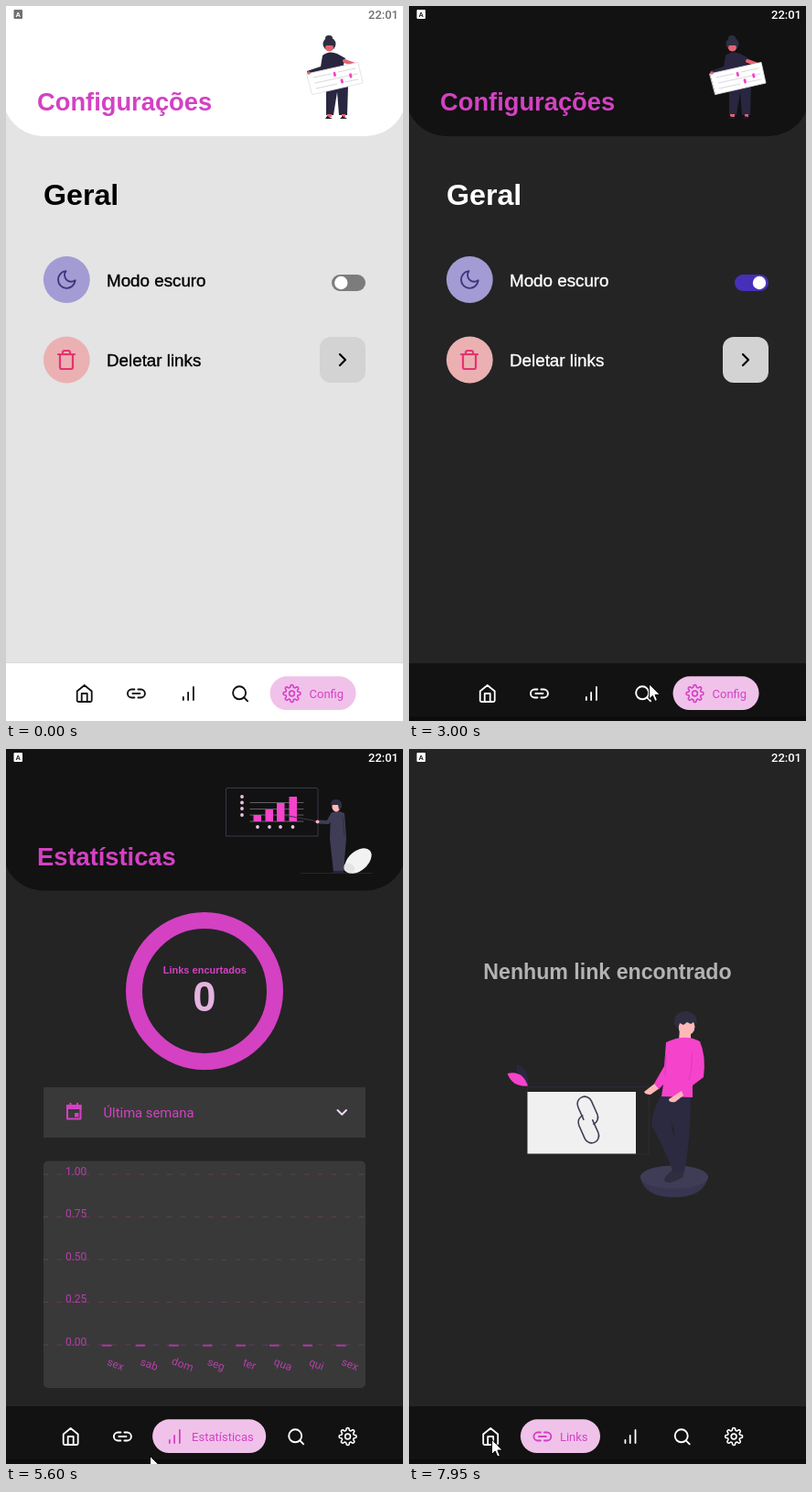
Animation, 434 px wide and 780 px high, one loop 8 s. Source, as an HTML page with a canvas:

```html
<!DOCTYPE html>
<html lang="pt-BR">
<head>
<meta charset="utf-8">
<title>Configurações</title>
<style>
  html, body { margin: 0; width: 100%; height: 100%; overflow: hidden; background: #242424; }
  canvas { display: block; width: 434px; height: 780px; }
</style>
</head>
<body>
<canvas id="stage"></canvas>
<script>
const W = 434, H = 780, LOOP = 8000;
const canvas = document.getElementById('stage');
const ctx = canvas.getContext('2d');
const dpr = window.devicePixelRatio || 1;
canvas.width = W * dpr;
canvas.height = H * dpr;

const PINK = '#d441c3', HOT = '#f543cb', INK = '#2f2e41', SLATE = '#3f3d56', SKIN = '#ffb8b8';
const SANS = '"Liberation Sans", Arial, sans-serif';
const ROBOTO = 'Roboto, sans-serif';

const THEME_AT = 1960;
const clamp = v => Math.max(0, Math.min(1, v));
const mix = (a, b, p) => a + (b - a) * p;
const ramp = (t, from, to) => clamp((t - from) / (to - from));
const easeInOut = p => p < .5 ? 2 * p * p : 1 - 2 * (1 - p) * (1 - p);

// Drawing helpers

function fill(color, d) {
  ctx.fillStyle = color;
  ctx.fill(new Path2D(d));
}

function line(color, width, d) {
  ctx.strokeStyle = color;
  ctx.lineWidth = width;
  ctx.lineCap = ctx.lineJoin = 'round';
  ctx.stroke(new Path2D(d));
}

function box(color, x, y, w, h, r = 0) {
  ctx.fillStyle = color;
  ctx.beginPath();
  ctx.roundRect(x, y, w, h, r);
  ctx.fill();
}

function oval(color, x, y, rx, ry = rx, turn = 0) {
  ctx.fillStyle = color;
  ctx.beginPath();
  ctx.ellipse(x, y, rx, ry, turn, 0, Math.PI * 2);
  ctx.fill();
}

function ring(color, x, y, r, width) {
  ctx.strokeStyle = color;
  ctx.lineWidth = width;
  ctx.beginPath();
  ctx.arc(x, y, r, 0, Math.PI * 2);
  ctx.stroke();
}

function at(x, y, draw, turn = 0, scale = 1) {
  ctx.save();
  ctx.translate(x, y);
  ctx.rotate(turn);
  ctx.scale(scale, scale);
  draw();
  ctx.restore();
}

function text(s, x, y, size, color, { weight = 400, family = SANS, align = 'left', heavier = 0 } = {}) {
  ctx.font = `${weight} ${size}px ${family}`;
  ctx.textAlign = align;
  ctx.fillStyle = color;
  ctx.fillText(s, x, y);
  if (heavier) {
    ctx.strokeStyle = color;
    ctx.lineWidth = heavier;
    ctx.strokeText(s, x, y);
  }
}

// Icons, centred on the origin

const icons = {
  home(c) {
    line(c, 1.8, 'M-8 -2.5L0 -9L8 -2.5V7.5a1.5 1.5 0 0 1 -1.5 1.5H-6.5a1.5 1.5 0 0 1 -1.5 -1.5ZM-3 9V0H3V9');
  },
  link(c) {
    line(c, 1.9, 'M-2 -4.5H-5a4.5 4.5 0 0 0 0 9H-2M2 -4.5H5a4.5 4.5 0 0 1 0 9H2M-4 0H4');
  },
  bars(c) {
    line(c, 1.8, 'M-5.3 7V4M0 7V-1M5.8 7V-7');
  },
  search(c) {
    ring(c, -.7, -.7, 7, 1.9);
    line(c, 1.9, 'M4.4 4.4L8.3 8.3');
  },
  gear(c) {
    ctx.beginPath();
    for (let i = 0; i <= 120; i++) {
      const a = i / 120 * Math.PI * 2;
      const r = 8.1 + 1.3 * Math.tanh(2 * Math.cos(8 * a + Math.PI)) / Math.tanh(2);
      ctx.lineTo(r * Math.cos(a + .39), r * Math.sin(a + .39));
    }
    ctx.closePath();
    ctx.strokeStyle = c;
    ctx.lineWidth = 1.6;
    ctx.lineJoin = 'round';
    ctx.stroke();
    ring(c, 0, 0, 2.9, 1.6);
  }
};

// Bottom navigation

const tabs = [
  { icon: 'home', label: 'Início' },
  { icon: 'link', label: 'Links' },
  { icon: 'bars', label: 'Estatísticas' },
  { icon: 'search', label: 'Pesquisa' },
  { icon: 'gear', label: 'Config' }
];
const STEP = 56.7;

const visits = [
  { tab: 4, at: -2000, page: settingsPage },
  { tab: 3, at: 3270, page: searchPage },
  { tab: 2, at: 4980, page: statsPage },
  { tab: 1, at: 6490, page: linksPage }
];
const PAGE_DELAY = 160, PILL_DELAY = 140, PILL_TIME = 450;

function layout(active) {
  ctx.font = `400 13px ${ROBOTO}`;
  const label = ctx.measureText(tabs[active].label).width;
  const first = 104.5 - label / 2;
  const x = tabs.map((_, i) => first + STEP * i + (i > active ? label + 8.5 : 0));
  return { x, pill: label + 56.5 };
}

function navBar(t, dark) {
  box(dark ? '#121212' : '#ffffff', 0, 717, W, 63);
  if (dark) box('#0c0c0c', 0, 775, W, 5);
  else box('#d9d9d9', 0, 716, W, 1);

  const n = visits.findLastIndex(v => t >= v.at);
  const { tab, at: began } = visits[n];
  const now = layout(tab);
  const from = n ? layout(visits[n - 1].tab).x[tab] : now.x[tab];
  const p = easeInOut(ramp(t, began + PILL_DELAY, began + PILL_DELAY + PILL_TIME));
  const center = mix(from, now.x[tab], p);
  const width = mix(48, now.pill, p);

  tabs.forEach(({ icon }, i) => {
    if (i !== tab) at(now.x[i], 750, () => icons[icon](dark ? '#ffffff' : '#111111'));
  });

  ctx.save();
  ctx.beginPath();
  ctx.roundRect(center - 24, 731.3, width, 36.8, 18.4);
  ctx.fillStyle = '#f0c2ea';
  ctx.fill();
  ctx.clip();
  at(center, 750, () => icons[tabs[tab].icon](PINK));
  ctx.globalAlpha = p;
  text(tabs[tab].label, center + 19, 755.3, 13, PINK, { family: ROBOTO });
  ctx.restore();
}

// Shared page parts

function statusBar(t, dark) {
  const g = Math.round(dark ? mix(66, 255, ramp(t, 2020, 2230)) : 112);
  const color = `rgb(${g},${g},${g})`;
  box(color, 8.5, 4, 9.5, 10, 1);
  text('A', 13.3, 11.8, 7.5, dark ? '#202020' : '#ffffff', { weight: 700, align: 'center' });
  text('22:01', 429, 14, 13, color, { weight: 500, family: ROBOTO, align: 'right' });
}

function header(title, bottom, dark) {
  box(dark ? '#121212' : '#ffffff', -4, -60, W + 8, bottom + 60, 45);
  text(title, 34, bottom - 28, 27.3, PINK, { weight: 700 });
}

function bigText(s, y) {
  text(s, 217, y, 23.15, '#b3b3b3', { weight: 700, align: 'center' });
}

// Pages

function settingsPage(t, dark) {
  header('Configurações', 142, dark);
  checkHolder();
  const ink = dark ? '#ffffff' : '#000000';
  text('Geral', 41, 217, 32.2, ink, { weight: 700 });

  oval('#a39bd3', 66.3, 298.5, 25.4);
  at(66.3, 298.5, () => line('#40347c', 1.8,
    'M9 .8A9 9 0 1 1 -.8 -9A7 7 0 0 0 9 .8Z'), 0, 1.04);
  text('Modo escuro', 110, 306, 18.8, ink, { heavier: .35 });
  box(dark ? '#4630b9' : '#7c7c7c', 356, 293, 37, 18, 9);
  oval('#ffffff', mix(366.3, 383, easeInOut(ramp(t, 2030, 2250))), 302, 7.2);

  oval('#ebb1b2', 66.3, 386, 25.4);
  at(66, 386, () => line('#e6336f', 2.2,
    'M-9 -6H9M-7 -6V8a2 2 0 0 0 2 2H5a2 2 0 0 0 2 -2V-6M-4 -6V-8a2 2 0 0 1 2 -2H2a2 2 0 0 1 2 2V-6'));
  text('Deletar links', 110, 393, 18.8, ink, { heavier: .35 });
  box('#d3d3d3', 343, 361, 50, 50, 12);
  line('#000000', 2.2, 'M365 380L371 386L365 392');
}

function checkHolder() {
  const cloth = '#292640';
  fill(cloth, 'M350 86H374L373 119H364L362 94L358 119H350Z');
  fill('#e26472', 'M351 118h5v3h-5zM367 118h4v3h-4z');
  fill('#1d1b2e', 'M349 123L351 120L357 123ZM365 123L368 120L373 123Z');
  fill(cloth, 'M346 54Q353 48 362 52L371 57L369 64L373 70V92H350V72L330 74L329 71L344 66Z');
  line('#e26472', 4, 'M370 60L384 65');
  oval(INK, 353, 35, 4, 3);
  oval(INK, 353.5, 41.5, 7);
  oval('#e26472', 353.5, 45.5, 4.5, 4);
  box(INK, 347, 39, 13, 4, 1);
  const sheet = 'M329 74L385 61.5L390 84L335 96.5Z';
  fill('#ffffff', sheet);
  line('#e3e3e6', .9, sheet);
  line('#d5d5da', .9, 'M336 78L355 74M363 72L382 68M338 84L384 74M339 90L362 85M370 83L385 80');
  for (const [x, y] of [[359, 74.5], [367, 82], [376.5, 76]]) {
    line(HOT, 2.8, `M${x} ${y - 1.2}l.6 2.4`);
  }
  oval('#e26472', 331, 73, 1.8);
}

function searchPage() {
  box('#3a3a3a', 41, 53, 352, 55, 9);
  at(67, 80, () => icons.search('#ffffff'), 0, 1.17);
  text('Pesquisar', 94, 87, 16.6, '#232323');
  bigText('Pesquise entre seus links', 254.5);
  bigText('encurtados', 279.5);
  browserWindow();
  searcher();
}

function browserWindow() {
  box('#e6e6e6', 68.5, 314, 267.5, 172);
  box(HOT, 68.5, 314, 267.5, 11.6);
  for (const x of [76.5, 85, 93]) oval('#ffffff', x, 320, 2.1);
  box('#ffffff', 76.5, 335.5, 251.5, 140.5);
  const blocks = [[99, 350, 65, 111], [175, 389, 54, 27], [175, 430, 54, 31],
    [241, 350, 65, 49], [241, 413, 65, 48]];
  for (const b of blocks) box('#e6e6e6', ...b);
  box(HOT, 175, 350, 54.5, 31);
}

function searcher() {
  line('#8b8b8d', 1, 'M204.5 545.5H361.5');
  fill(SKIN, 'M258 533h7l-1 8h-6zM307 530l7 -1l2 7l-6 2z');
  fill(INK, 'M249 545.5Q252 541 258 540L266 540V545.5ZM302 545.5Q304 540 310 538L317 540V545.5Z');
  fill('#2c2941', 'M264 474L306 470Q314 500 322 531L304 535L286 478L284 482Q274 510 267 535L250 534Q258 500 264 474Z');
  fill(INK, 'M280 412Q294 404 310 409L323 432Q324 440 312 448L315 478Q288 479 261 474L265 430L270 416Z');
  fill(HOT, 'M281 411L297 407Q297 430 291 444L276 438Z');
  fill(SKIN, 'M282 393H294V405Q287 407 282 400Z');
  fill(INK, 'M278 392Q280 377 295 378Q309 381 308 396L308 404Q300 407 293 403L293 391L284 391L281 394Z');
  oval(SKIN, 262, 430, 5, 4, .4);

  ring(INK, 206.5, 374.5, 44.5, 6);
  ctx.save();
  ctx.beginPath();
  ctx.arc(206.5, 374.5, 46, 0, Math.PI * 2);
  ctx.arc(209.5, 373, 44, 0, Math.PI * 2, true);
  ctx.fillStyle = '#272538';
  ctx.fill('evenodd');
  ctx.restore();
  ring(SLATE, 206.5, 374.5, 50, 12);
  line(SLATE, 7, 'M247 408L262 420');
  line(SLATE, 10.5, 'M262 420L318.5 468.5');
  oval(SKIN, 296, 445, 4.8, 4.4);
  line(INK, 9, 'M316 434L303 443');
}

function statsPage(t, dark) {
  header('Estatísticas', 154.5, dark);
  presenter();
  ring(PINK, 217, 264, 77, 18);
  text('Links encurtados', 217.3, 245, 11, PINK, { weight: 700, align: 'center' });
  text('0', 217, 286, 45.5, '#e4b3df', { weight: 700, align: 'center' });

  box('#393939', 41, 369, 352, 55);
  line(PINK, 2, 'M67 389H81.5V403.5H67ZM70.5 389V386.7M78 389V386.7');
  box(PINK, 66, 388, 16.5, 5);
  box(PINK, 75, 397, 4.5, 4.5);
  text('Última semana', 106.5, 402.3, 14.8, PINK, { family: ROBOTO });
  line('#f3d5f0', 2, 'M362.5 394L367.3 398.7L372 394');
  chart();
}

function chart() {
  box('#393939', 41, 449.5, 352, 247.5, 5);
  ctx.save();
  ctx.setLineDash([5, 10]);
  for (let i = 0; i < 5; i++) {
    line('rgba(212,65,195,.25)', 1, `M41 ${464 + i * 46.5}H393`);
  }
  ctx.restore();
  for (let i = 0; i < 5; i++) {
    text((1 - i / 4).toFixed(2), 88.3, 464.8 + i * 46.5, 12, '#b53fa8', { family: ROBOTO, align: 'right' });
  }
  'sex sab dom seg ter qua qui sex'.split(' ').forEach((day, i) => {
    const x = 105 + i * 36.6;
    box('#a93c9d', x, 649.7, 10.5, 2);
    at(x + 13.5, 675, () => text(day, 0, 0, 12, '#b53fa8', { family: ROBOTO, align: 'center' }), .35);
  });
}

function presenter() {
  line(SLATE, .9, 'M242 42.5H339Q341 42.5 341 44.5V95H240.5V44Q240.5 42.5 242 42.5Z');
  line('#77737c', .8, 'M267 58.5H325M267 65.5H325M267 72H325M267 79H325');
  [7, 13, 20, 27].forEach((h, i) => box(HOT, [270.5, 283.5, 296, 309.5][i], 79 - h, 8.5, h));
  for (const y of [52, 58.5, 65, 72]) oval('#e5c4df', 258, y, 1.9);
  for (const x of [275, 288, 300, 313.5]) oval('#e5c4df', x, 85, 1.9);
  line('#2b2936', .8, 'M322 135.5H400');
  oval('#f2f2f2', 385, 122, 17, 10.5, -.72);
  oval('#e4e4e4', 375, 130, 6.5, 5, .5);
  line('#3b3950', 1.1, 'M341 79L306 72.5');
  fill(SLATE, 'M355 70Q362 66 370 70L372 97L369 134H363L362 104L363 134H358L354 98Z');
  fill('#262438', 'M358 133H364V136H355ZM364 133H369V136H363Z');
  line(SLATE, 4, 'M356 73L352 80L342 79.5');
  line('#302e44', 1, 'M368 74L370 95');
  oval(SKIN, 340.5, 79.3, 1.9);
  oval(SKIN, 361, 63, 4.6, 5.4);
  fill(INK, 'M355 61Q355 54.5 361 55Q368 55 367 64L364 66L363 61Z');
}

function linksPage() {
  bigText('Nenhum link encontrado', 250.8);
  fill('#292740', 'M130 367Q115 358 118 344Q132 349 130 367Z');
  fill(HOT, 'M130 367.5Q113 369 107.5 354Q124 350 130 367.5Z');
  line('#2d2b38', 1, 'M130 368.5H262.5V442H130Z');
  box('#f0f0f0', 129.5, 374, 118.5, 67.5);
  const loop = 'M-8 7V-8a8 8 0 0 1 16 0V8a8 8 0 0 1 -8 8';
  at(195.3, 394.5, () => line(SLATE, 1.6, loop), -.42);
  at(196.3, 414.5, () => line(SLATE, 1.6, loop), Math.PI - .42);
  standingMan();
}

function standingMan() {
  fill('#383550', 'M253 468Q258 489 290 489Q321 489 327 468Z');
  oval(SLATE, 290, 467, 37.2, 12.6);
  fill('#2c2a40', 'M276 377H308Q308 420 302 456L299 468L290 465Q288 440 290 416L286 407L297 460Q291 471 284 473Q277 472 281 466L288 459Q276 430 266 412Q263 400 276 377Z');
  fill(INK, 'M279 471Q280 465 287 461L300 460L299 467Q290 473 282 473Z');
  fill(SKIN, 'M296 304H308V319H295ZM271 363L274 370L264 377Q258 377 257 374Z');
  fill(HOT, 'M281 320Q302 310 318 319Q325 335 322 358L310 367V380L276 379L278 366L273 371L268 365L279 346Z');
  line('#dc39b6', 1, 'M309 332Q310 348 306 361M281 333L280 357');
  fill(SKIN, 'M298 373L300 378L291 385Q284 386 284 382Z');
  oval(SKIN, 303.5, 303, 9, 9.5);
  fill(INK, 'M290 300Q289 287 303 286Q316 288 314.5 300L311 298L308 300L304 298L300 301L296 299L294 305Z');
}

// Pointer path: time, x, y

const route = [
  [730, 434, 247], [1420, 378, 290], [1550, 378, 291], [1800, 378, 308], [2020, 378, 311],
  [2300, 371, 517], [3150, 255, 754], [3270, 255, 752], [3470, 255, 750], [3800, 252, 748],
  [4030, 217, 747], [4550, 182, 761], [4850, 194, 757], [5350, 194, 757], [5600, 157, 771],
  [5730, 139, 769], [6290, 127, 753], [6690, 126, 751], [7080, 126, 753], [7250, 122, 765],
  [7950, 90, 753], [8000, 90, 753]
];

function pointer(t) {
  const i = route.findIndex(k => k[0] > t);
  if (i < 1) return;
  const [t0, x0, y0] = route[i - 1], [t1, x1, y1] = route[i];
  const p = easeInOut(ramp(t, t0, t1));
  at(mix(x0, x1, p), mix(y0, y1, p), () => {
    const arrow = 'M.5 .5V16.5L4.2 13L6.8 19L9.4 17.9L6.9 12H12Z';
    fill('#ffffff', arrow);
    line('#000000', 1, arrow);
  });
}

function draw(t) {
  ctx.setTransform(dpr, 0, 0, dpr, 0, 0);
  const dark = t >= THEME_AT;
  box(dark ? '#242424' : '#e4e4e4', 0, 0, W, H);
  visits.findLast(v => t >= v.at + PAGE_DELAY).page(t, dark);
  statusBar(t, dark);
  navBar(t, dark);
  pointer(t);
}

function tick() {
  draw(performance.now() % LOOP);
  requestAnimationFrame(tick);
}
tick();
</script>
</body>
</html>
```
